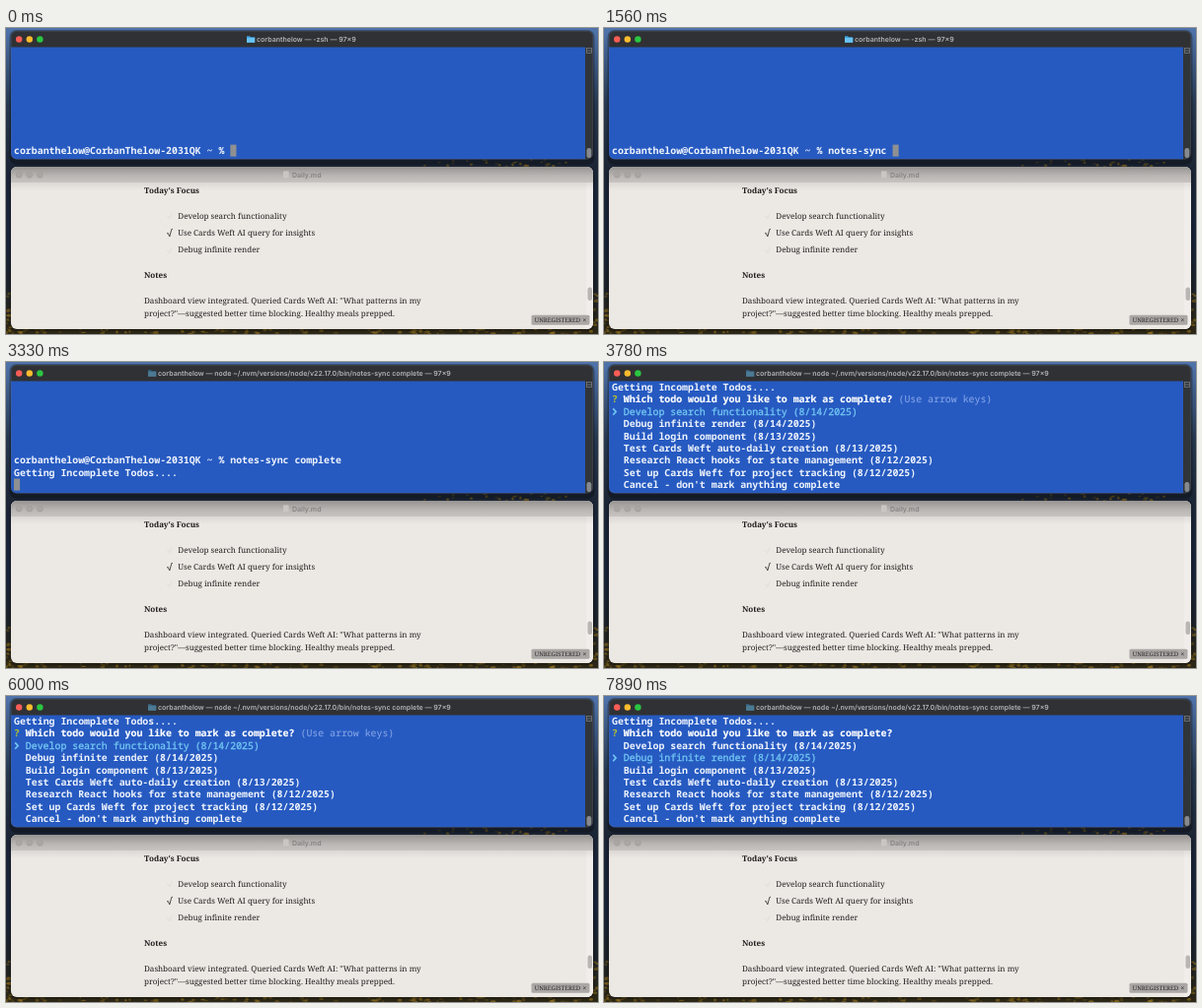
Recreate the animation shown at these times as an HTML page. Size 600 px wide and 311 px high, loop 8 s.

```html
<!DOCTYPE html>
<html lang="en">
<head>
<meta charset="utf-8">
<title>Marking a todo complete</title>
<style>
  html, body { margin: 0; width: 100%; height: 100%; overflow: hidden; background: #141b26; }
  svg { display: block; width: 100%; height: 100%; }
  text { white-space: pre; text-rendering: geometricPrecision; }
  .bar { font: 600 7px Inter, Roboto, sans-serif; }
  .term { font: 600 9.88px "Noto Sans Mono", "DejaVu Sans Mono", monospace; fill: #eef3fc; }
  .strong { font-weight: 700; fill: #fff; stroke: #fff; stroke-width: .15; }
  .mark { fill: #b5c02a; }
  .hint { font-weight: 500; fill: #82a2e6; stroke: #82a2e6; stroke-width: .1; }
  .picked { font-weight: 500; fill: #75c9f4; stroke: #75c9f4; stroke-width: .3; }
  .doc { font: 8.05px "Noto Serif", "Liberation Serif", serif; fill: #211f1e; }
  .head { font-weight: 700; fill: #1d1b1a; }
  .tick { fill: none; stroke: #2b2927; stroke-width: .8; }
  .faint { stroke: #d9d5d1; stroke-width: .5; }
</style>
</head>
<body>
<svg viewBox="0 0 600 311" preserveAspectRatio="none">
  <defs>
    <linearGradient id="scene" x2="0" y2="1">
      <stop offset="0" stop-color="#5074ab"/>
      <stop offset=".1" stop-color="#3d5a85"/>
      <stop offset=".25" stop-color="#26384f"/>
      <stop offset=".45" stop-color="#1b2536"/>
      <stop offset=".7" stop-color="#182338"/>
      <stop offset=".85" stop-color="#1c2228"/>
      <stop offset="1" stop-color="#2c2614"/>
    </linearGradient>
    <linearGradient id="shade" x2="0" y2="1">
      <stop offset="0" stop-opacity=".3"/>
      <stop offset=".4" stop-opacity=".13"/>
      <stop offset="1" stop-opacity="0"/>
    </linearGradient>
    <clipPath id="top"><rect x="5" y="3" width="590" height="130.5" rx="6"/></clipPath>
    <clipPath id="low"><rect x="5" y="141" width="590" height="165" rx="6"/></clipPath>
  </defs>

  <!-- desktop -->
  <rect width="600" height="311" fill="url(#scene)"/>
  <g id="trees" fill="#8a6c1e"></g>
  <rect x="3.5" y="2" width="593" height="137" rx="7" opacity=".3"/>
  <rect x="3.5" y="140" width="593" height="168" rx="7" opacity=".2"/>

  <!-- terminal window -->
  <g clip-path="url(#top)">
    <rect x="5" y="3" width="590" height="131" fill="#30353a"/>
    <rect x="5" y="3" width="590" height="16.5" fill="#303134"/>
    <rect x="5" y="19.5" width="582" height="114" fill="#265ac1"/>
    <rect x="588.5" y="20.5" width="5" height="5" fill="none" stroke="#777b80" stroke-width=".8"/>
    <path d="M588.5 23h5" stroke="#777b80" stroke-width=".8"/>
    <rect x="588.5" y="122" width="4.8" height="10" rx="2.2" fill="#86898d"/>
  </g>
  <rect x="5.4" y="3.4" width="589.2" height="129.8" rx="5.7" fill="none" stroke="#777a7e" stroke-width=".6" opacity=".35"/>
  <circle cx="13.2" cy="11.5" r="3.2" fill="#fb5d56"/>
  <circle cx="23.8" cy="11.5" r="3.2" fill="#fabc2f"/>
  <circle cx="34.4" cy="11.5" r="3.2" fill="#2ac641"/>
  <g id="caption">
    <g id="folder">
      <path d="M0 8.2h3l1 1h4.2v5.6H0z" fill="#3f9fdc"/>
      <rect y="9.9" width="8.2" height="4.9" rx=".6" fill="#69c3f2"/>
    </g>
    <text id="title" class="bar" x="10" y="13.9" fill="#b4b5b7"></text>
  </g>
  <g id="shell" class="term">
    <text id="prompt" x="8"></text>
    <text id="status" x="8"></text>
    <rect id="cursor" y="118.6" width="6.1" height="12" fill="#8f9092"/>
  </g>
  <g id="menu" class="term"></g>

  <!-- document window -->
  <g clip-path="url(#low)">
    <rect x="5" y="141" width="590" height="165" fill="#ece8e4"/>
    <rect x="5" y="141" width="590" height="16" fill="#d6d2cf"/>
    <rect x="588" y="157" width="7" height="149" fill="#f0edea"/>
    <rect x="589.5" y="263.5" width="4.5" height="13.5" rx="2.2" fill="#b9b6b3"/>
    <rect x="5" y="141" width="590" height="24" fill="url(#shade)"/>
  </g>
  <g fill="#aaa6a3" stroke="#9c9896" stroke-width=".5">
    <circle cx="13.2" cy="149.2" r="3"/>
    <circle cx="23.8" cy="149.2" r="3"/>
    <circle cx="34.4" cy="149.2" r="3"/>
  </g>
  <rect x="281" y="145.6" width="5.6" height="7" rx=".5" fill="#c9c6c3"/>
  <text class="bar" x="290" y="151.6" fill="#858280">Daily.md</text>
  <g class="doc">
    <text class="head" x="140" y="167.6">Today's Focus</text>
    <text x="174.3" y="193.7">Develop search functionality</text>
    <text x="174.3" y="211">Use Cards Weft AI query for insights</text>
    <text x="174.3" y="228.3">Debug infinite render</text>
    <text class="head" x="140" y="254.2">Notes</text>
    <text x="140" y="280">Dashboard view integrated. Queried Cards Weft AI: "What patterns in my</text>
    <text x="140" y="293">project?"—suggested better time blocking. Healthy meals prepped.</text>
  </g>
  <path class="tick faint" d="M163 191.6l1.2-.5 1.6 3 2.4-6.2"/>
  <path class="tick" d="M163 209l1.2-.6 1.6 3.6 2.1-7.6h1"/>
  <path class="tick faint" d="M163 226.3l1.2-.5 1.6 3 2.4-6.2"/>
  <rect x="532.5" y="291.8" width="59" height="10" rx="1.5" fill="#aaa7a5"/>
  <text x="535.8" y="299" font-family="Noto Serif, Liberation Serif, serif" font-size="6.1" font-weight="500" fill="#2a2827">UNREGISTERED</text>
  <path d="M585.2 295.5l2.4 2.4m0-2.4l-2.4 2.4" stroke="#2a2827" stroke-width=".7"/>
</svg>

<script>
  const LOOP = 8000;
  const ENTER = 2780, LOADING = 3000, MENU = 3450, DOWN = 6950;
  const CELL = 5.928, LEFT = 8;
  const user = "corbanthelow";
  const prompt = user + "@CorbanThelow-2031QK ~ % ";
  const command = "notes-sync complete";
  const idleTitle = user + " — -zsh — 97×9";
  const busyTitle = user + " — node ~/.nvm/versions/node/v22.17.0/bin/" + command + " — 97×9";
  const loading = "Getting Incomplete Todos....";
  const todos = [
    "Develop search functionality (8/14/2025)",
    "Debug infinite render (8/14/2025)",
    "Build login component (8/13/2025)",
    "Test Cards Weft auto-daily creation (8/13/2025)",
    "Research React hooks for state management (8/12/2025)",
    "Set up Cards Weft for project tracking (8/12/2025)",
    "Cancel - don't mark anything complete"
  ];

  const $ = id => document.getElementById(id);
  const baseline = row => 28.9 + 12.42 * row;
  const show = (el, on) => { el.style.display = on ? "" : "none"; };

  function add(parent, tag, attrs, content = "") {
    const el = document.createElementNS(parent.namespaceURI, tag);
    for (const key in attrs) el.setAttribute(key, attrs[key]);
    el.textContent = content;
    return parent.appendChild(el);
  }
  const put = (row, col, content, cls = "") =>
    add($("menu"), "text", { x: LEFT + col * CELL, y: baseline(row), class: cls }, content);

  // Autumn trees showing along the lower edge and in the gap on the right
  let seed = 7;
  const random = () => (seed = seed * 16807 % 2147483647) / 2147483647;
  function plant(count, x, y, w, h) {
    for (let i = 0; i < count; i++) add($("trees"), "ellipse", {
      cx: x + random() * w, cy: y + random() * h,
      rx: 1 + random() * 2, ry: .6 + random(), opacity: .2 + random() * .5
    });
  }
  plant(110, 0, 306, 600, 5);
  plant(30, 420, 133, 150, 8);
  plant(14, 0, 270, 5, 40);
  plant(14, 595, 270, 5, 40);

  const question = "Which todo would you like to mark as complete?";
  put(0, 0, loading);
  put(1, 0, "?", "mark");
  put(1, 2, question, "strong");
  const hint = put(1, question.length + 3, "(Use arrow keys)", "hint");
  const items = todos.map((todo, i) => put(i + 2, 2, todo));
  const pointer = add($("menu"), "path", {
    d: "M9.2 -6.4l2.9 3.2-2.9 3.2", fill: "none", stroke: "#75c9f4", "stroke-width": 1.6
  });

  function draw(t) {
    const busy = t >= ENTER, open = t >= MENU;
    const typed = Math.max(0, Math.min(command.length, Math.floor((t - 890) / 111 + 5.2)));
    const text = prompt + command.slice(0, typed);

    $("title").textContent = busy ? busyTitle : idleTitle;
    $("caption").setAttribute("transform", `translate(${busy ? 144 : 244} 0)`);
    $("folder").setAttribute("opacity", busy ? .5 : 1);

    show($("shell"), !open);
    show($("menu"), open);
    $("prompt").textContent = text;
    $("prompt").setAttribute("y", baseline(t >= LOADING ? 6 : busy ? 7 : 8));
    $("status").textContent = t >= LOADING ? loading : "";
    $("status").setAttribute("y", baseline(7));
    $("cursor").setAttribute("x", LEFT + (busy ? 0 : text.length * CELL));

    const pick = t >= DOWN ? 1 : 0;
    show(hint, pick === 0);
    items.forEach((item, i) => item.setAttribute("class", i === pick ? "picked" : ""));
    pointer.setAttribute("transform", `translate(0 ${baseline(pick + 2)})`);
  }

  const start = performance.now();
  function tick() {
    draw((performance.now() - start) % LOOP);
    requestAnimationFrame(tick);
  }
  tick();
</script>
</body>
</html>
```
